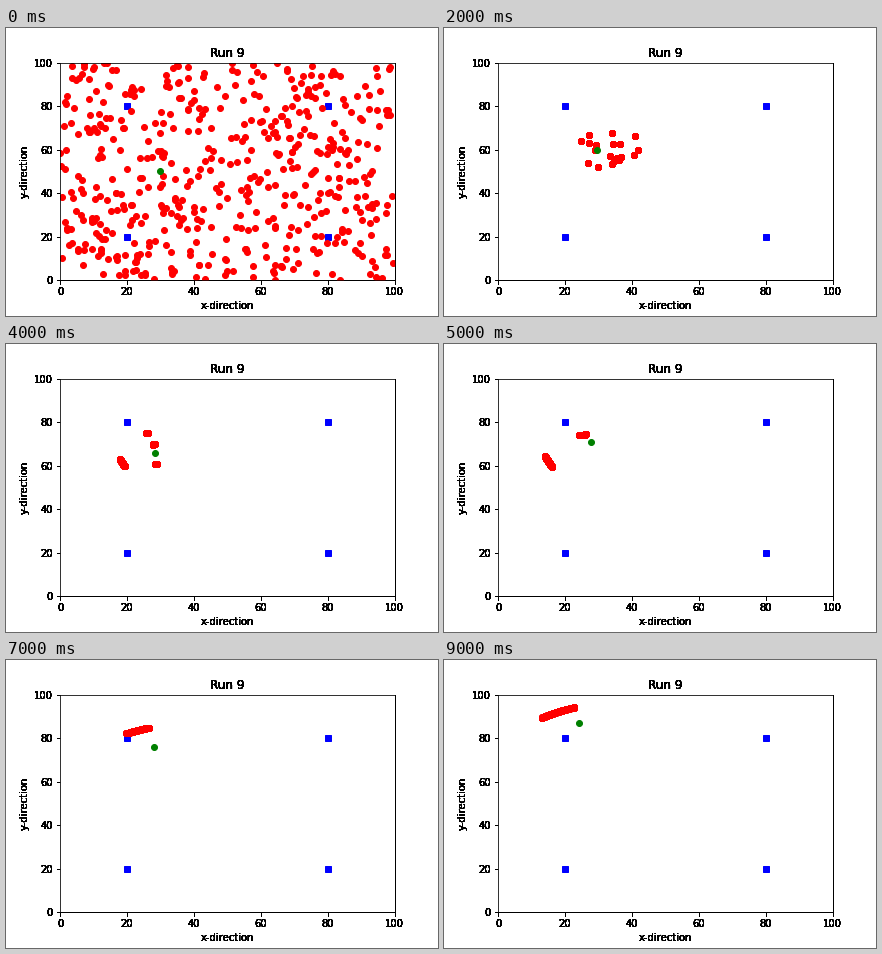
Write a matplotlib script that moves like this. It is 432 px wide and 288 px high and loops after 10 s.

```python
import numpy as np
import matplotlib.pyplot as plt
from matplotlib.animation import FuncAnimation

STEPS = 10
COUNT = 500
LAYERS = 15
HUBS = [(26, 74.8), (28, 69.8), (28.4, 60.9)]
DRIFT = np.array([-1.5, 5])

plt.rcParams["font.family"] = "DejaVu Sans"


def blob(rng, center, radii, survivors):
    """Copies of a few survivors spread evenly over an ellipse."""
    angle = rng.uniform(0, 2 * np.pi, survivors)
    reach = np.sqrt(rng.uniform(0, 1, survivors))
    spots = np.column_stack([np.cos(angle), np.sin(angle)]) * reach[:, None]
    spots = np.asarray(center) + spots * radii
    return spots[np.arange(COUNT) % survivors]


def streak(tail, head, bow=0.0):
    """Particles packed along a slightly bowed line."""
    t = np.linspace(0, 1, COUNT)[:, None]
    tail, head = np.array(tail), np.array(head)
    return tail + (head - tail) * t + np.array([0, 4 * bow]) * t * (1 - t)


def main_streak(step):
    u = step - 6
    tail = (22.3 - 2.2 * u - 0.3 * u**2, 78.2 + 4 * u - 0.1 * u**2)
    head = (26.9 + 0.2 * u - 0.52 * u**2, 79.7 + 5.25 * u - 0.15 * u**2)
    return streak(tail, head, 0.13 * max(u, 0))


def side_streak(step):
    v = step - 4
    return streak((17.8 - 3.9 * v, 63.2 + 1.3 * v),
                  (19.3 - 3.1 * v, 59.6 - 0.5 * v))


def particles(step):
    rng = np.random.default_rng(40 + step)
    if step == 0:
        return rng.uniform(0, 100, (COUNT, 2))
    if step == 1:
        return blob(rng, (33, 66), (10.5, 11.5), 29)
    if step == 2:
        return blob(rng, (33, 61), (10, 9.5), 19)
    if step <= 4:
        groups = [blob(rng, hub + DRIFT * (step - 4), (0.6, 0.4), 3)
                  for hub in HUBS]
        return np.vstack(groups + [side_streak(step)])
    if step == 5:
        return np.vstack([side_streak(step), main_streak(step)])
    return main_streak(step)


robot_x = [30, 29.1, 29.5, 29, 28.5, 27.8, 27.3, 28.2, 24.6, 24.3]
robot_y = [50, 63, 60, 63, 65.6, 71, 79, 76.1, 86.3, 86.9]

fig = plt.figure(figsize=(6, 4), dpi=72, facecolor="white")


def add_axes():
    ax = fig.add_axes([0.125, 0.125, 0.775, 0.755])
    ax.set(xlim=(0, 100), ylim=(0, 100), title="Run 9",
           xlabel="x-direction", ylabel="y-direction")
    return ax


# Stacked copies harden the lettering's soft edges.
ax = [add_axes() for _ in range(LAYERS)][-1]

ax.plot([20, 20, 80, 80], [20, 80, 20, 80], "bs")
cloud, = ax.plot([], [], "ro")
robot, = ax.plot([], [], "o", color="green")


def draw(step):
    cloud.set_data(particles(step).T)
    robot.set_data([robot_x[step]], [robot_y[step]])
    return cloud, robot


anim = FuncAnimation(fig, draw, frames=STEPS, interval=1000,
                     repeat=True, repeat_delay=0)
plt.show()
```
